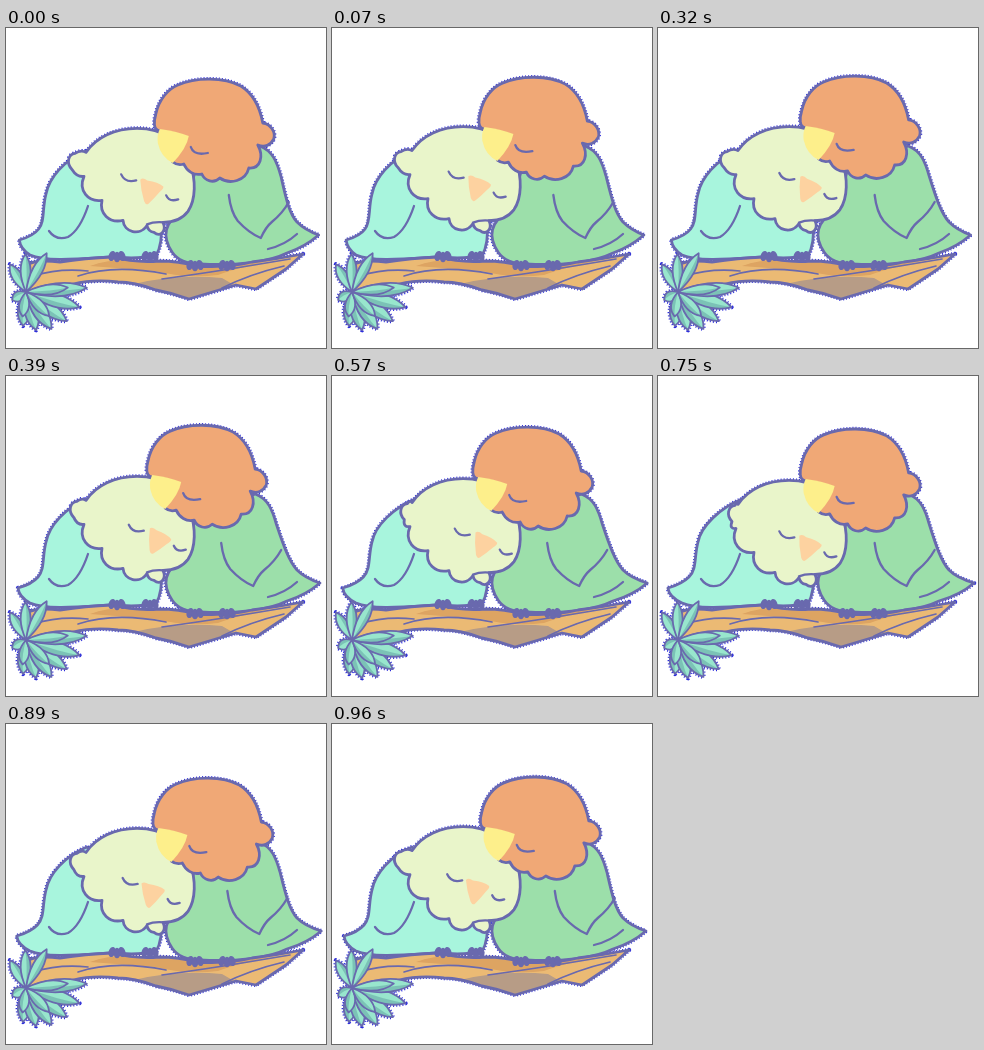
Recreate the animation shown at these times as an HTML page with a canvas. Size 320 px wide and 320 px high, loop 1140 ms.

```html
<!DOCTYPE html>
<html lang="en">
<head>
<meta charset="utf-8">
<title>Cuddling birds</title>
<style>
html, body { margin: 0; width: 100%; height: 100%; overflow: hidden; background: #fff; }
canvas { display: block; width: 100vw; height: 100vh; object-fit: contain; }
</style>
</head>
<body>
<canvas id="stage"></canvas>
<script>
const LOOP = 1140;
const INK = '#6969ae', FRINGE = '#2c2cdc';
const holds = [70, 70, 180, 70, 180, 180, 70, 70, 70, 180];
const canvas = document.getElementById('stage');
const ctx = canvas.getContext('2d');

// Every part swings once per loop; only the peaks differ.
function poseAt(step) {
  const swing = (peak, mid, amp) => mid + amp * Math.cos((step - peak) / holds.length * 2 * Math.PI);
  return {
    hx: swing(4.5, -4, -4),
    hy: swing(2.5, -1, -3.2),
    nub: Math.max(0, swing(6, -1, 9)),
    ly: swing(7, 0.5, 3.6),
    fx: swing(4.5, 148, 4),
    fy: swing(6.7, 164.5, 6.5),
    tilt: swing(3.7, 18.5, 6.5),
    tail: swing(6.5, 2, 2.2)
  };
}

function stepAt(t) {
  let step = 0;
  while (t >= holds[step]) t -= holds[step++];
  return step;
}

const head = new Path2D(`M154 104 C147 103 148 94 150 87 C153 73 162 62 172 58
  C190 50 218 50 235 59 C248 67 254 80 257 96 C265 97 270 105 268 112
  C265 118 259 121 252 118 C258 129 255 142 243 141 C240 154 224 158 214 151
  C208 157 199 154 196 147 C188 149 181 144 178 137 Q172 139 167 135`);
const beak = new Path2D('M154 102 Q170 104 183 109 Q181 121 167 136 Q155 130 152 116 Q151 108 154 102 Z');
const paleBeak = new Path2D('M-12 -7 Q-10 -10 -5 -8 Q6 -9 12 -6 Q13 -4 10 0 Q6 8 2 14 Q0 17 -3 13 Q-9 3 -12 -7 Z');
const branch = new Path2D(`M20 237 Q30 231 54 234 Q79 230 106 229 Q130 235 153 233
  Q173 233 190 238 Q222 240 246 234 Q271 231 297 226 L280 241 L250 261
  L230 257 L183 271 Q166 265 150 262 Q128 254 112 254 Q88 251 67 256 Q42 263 22 263 Z`);
const bark = new Path2D(`M84 238 Q106 229 153 233 L190 238 Q222 240 246 234 L284 229
  Q236 238 212 247 Q180 251 150 243 Z`);
const shade = new Path2D('M128 256 Q170 246 216 250 L228 257 L183 270 Q166 264 150 261 Z');
const grain = new Path2D(`M28 248 Q52 240 82 243 M72 248 Q108 236 160 246
  M156 251 Q200 245 236 239 T284 231 M216 260 Q244 246 278 238`);

function makeLeaf(angle, len, width) {
  const x = 20, y = 264;
  const at = (along, side) => {
    const c = Math.cos(angle), s = Math.sin(angle);
    return `${x + along * c - side * s} ${y + along * s + side * c}`;
  };
  const mid = len * .62, tip = at(len, 0);
  return {
    whole: new Path2D(`M${x} ${y} Q${at(mid, -width)} ${tip} Q${at(mid, width)} ${x} ${y} Z`),
    half: new Path2D(`M${x} ${y} Q${at(mid, -width)} ${tip} Q${at(mid, width * .2)} ${x} ${y} Z`)
  };
}

function fan(count, fromDeg, toDeg, fromLen, toLen, width) {
  return Array.from({ length: count }, (_, i) => {
    const k = i / (count - 1);
    const deg = fromDeg + (toDeg - fromDeg) * k;
    return makeLeaf(deg * Math.PI / 180, fromLen + (toLen - fromLen) * k, width);
  });
}

const leaves = [
  ...fan(3, -120, -62, 32, 44, 10),
  ...fan(6, 95, -4, 34, 61, 13),
  ...fan(4, 150, -6, 16, 42, 10)
];

function paleHead({ nub }) {
  return new Path2D(`M${66 + nub} 142 C${60 + nub} 136 ${62 + nub} 127 ${69 + nub} 126 Q${75 + nub / 2} 122 80 125
    C90 110 109 101 131 101 C144 101 155 104 163 110 L184 136
    C190 152 190 172 182 184 C176 192 167 195 157 195 C161 204 154 210 148 205
    Q142 204 141 198 C134 209 118 205 117 193 C103 196 93 186 96 173
    C82 175 72 163 78 149 Q71 150 ${66 + nub} 142 Z`);
}

function paleBody({ nub, tail }) {
  const n = nub * .5;
  return new Path2D(`M${80 + n} 123 C${58 + n} 132 43 150 40 166 C36 181 39 193 ${33 - tail / 2} 201
    Q${28 - tail} 208 ${14 - tail} 212 Q${15 - tail} 221 24 227 C40 234 72 231 105 229
    Q132 231 150 228 Q157 215 155 196 L130 170 Z`);
}

function greenBody({ hx, tail }) {
  const n = hx * .6;
  return new Path2D(`M${254 + n} 118 C${267 + n} 123 ${271 + n} 134 ${275 + n} 148
    C${280 + n / 2} 170 283 185 291 194 Q299 202 ${312 + tail} 207 Q${298 + tail} 219 281 225
    C263 234 231 238 194 236 Q174 236 166 224 C156 209 157 194 179 181 L190 140 Z`);
}

function stroke(path, width = 2.8, color = INK) {
  ctx.strokeStyle = color;
  ctx.lineWidth = width;
  ctx.stroke(path);
}

function fill(path, color) {
  ctx.fillStyle = color;
  ctx.fill(path);
}

function shape(path, color, width) {
  fill(path, color);
  stroke(path, width);
}

function line(d, width = 2.3) {
  stroke(new Path2D(d), width);
}

function moved(x, y, paint) {
  ctx.save();
  ctx.translate(x, y);
  paint();
  ctx.restore();
}

function foot(x, y) {
  ctx.fillStyle = INK;
  for (const side of [-1, 0, 1]) {
    ctx.beginPath();
    ctx.ellipse(x + side * 5, y - Math.abs(side), 3.4, 5.2, side * -.3, 0, 7);
    ctx.fill();
  }
}

// Dotted blue rim that shows only outside the filled shapes.
function fringe(p, still, pale) {
  const rim = path => stroke(path, 4.4, FRINGE);
  ctx.lineCap = 'butt';
  ctx.setLineDash([1, 2]);
  still.forEach(rim);
  moved(p.hx, p.hy, () => rim(head));
  moved(0, p.ly, () => rim(pale));
  ctx.setLineDash([]);
  ctx.lineCap = 'round';
}

function draw(p) {
  const left = paleBody(p), right = greenBody(p), pale = paleHead(p);
  fringe(p, [left, right, branch, ...leaves.map(l => l.whole)], pale);

  shape(right, '#9cdfaa');
  line('M262 221 Q279 217 291 206');
  moved(p.hx, 0, () =>
    line('M223 167 Q225 184 232 193 Q243 205 255 210 Q260 199 266 194 Q277 185 283 174'));

  shape(left, '#a8f5dd');
  line('M43 203 Q50 213 62 209 Q74 202 82 178');

  fill(branch, '#ebba74');
  fill(bark, '#dda462');
  fill(shade, '#b79c86');
  stroke(grain, 1.7);
  stroke(branch);
  for (const leaf of leaves) {
    fill(leaf.whole, '#7bc2b6');
    fill(leaf.half, '#98e6cd');
    stroke(leaf.whole, 1.8);
  }
  foot(111, 229);
  foot(144, 229);
  foot(189, 238);
  foot(221, 238);

  moved(0, p.ly, () => {
    shape(pale, '#e9f5ca');
    line('M141 197 Q148 194 158 195');
  });
  moved(p.fx, p.fy, () => {
    line('M-29 -15 Q-25 -6 -14 -9 M16 6 Q19 13 28 10');
    ctx.rotate(p.tilt * Math.PI / 180);
    fill(paleBeak, '#fdd2a0');
  });

  moved(p.hx, p.hy, () => {
    shape(head, '#f0a876');
    fill(beak, '#fdef8b');
    line('M185 120 Q188 129 202 126');
  });
}

function frame(now) {
  const size = Math.round(Math.min(innerWidth, innerHeight) * devicePixelRatio);
  if (canvas.width !== size) canvas.width = canvas.height = size;
  ctx.setTransform(1, 0, 0, 1, 0, 0);
  ctx.fillStyle = '#fff';
  ctx.fillRect(0, 0, size, size);
  ctx.scale(size / 320, size / 320);
  ctx.lineCap = ctx.lineJoin = 'round';
  draw(poseAt(stepAt(now % LOOP)));
}

let start;
function tick(now) {
  start ??= now;
  frame(Math.max(0, now - start));
  requestAnimationFrame(tick);
}
frame(0);
requestAnimationFrame(tick);
</script>
</body>
</html>
```
